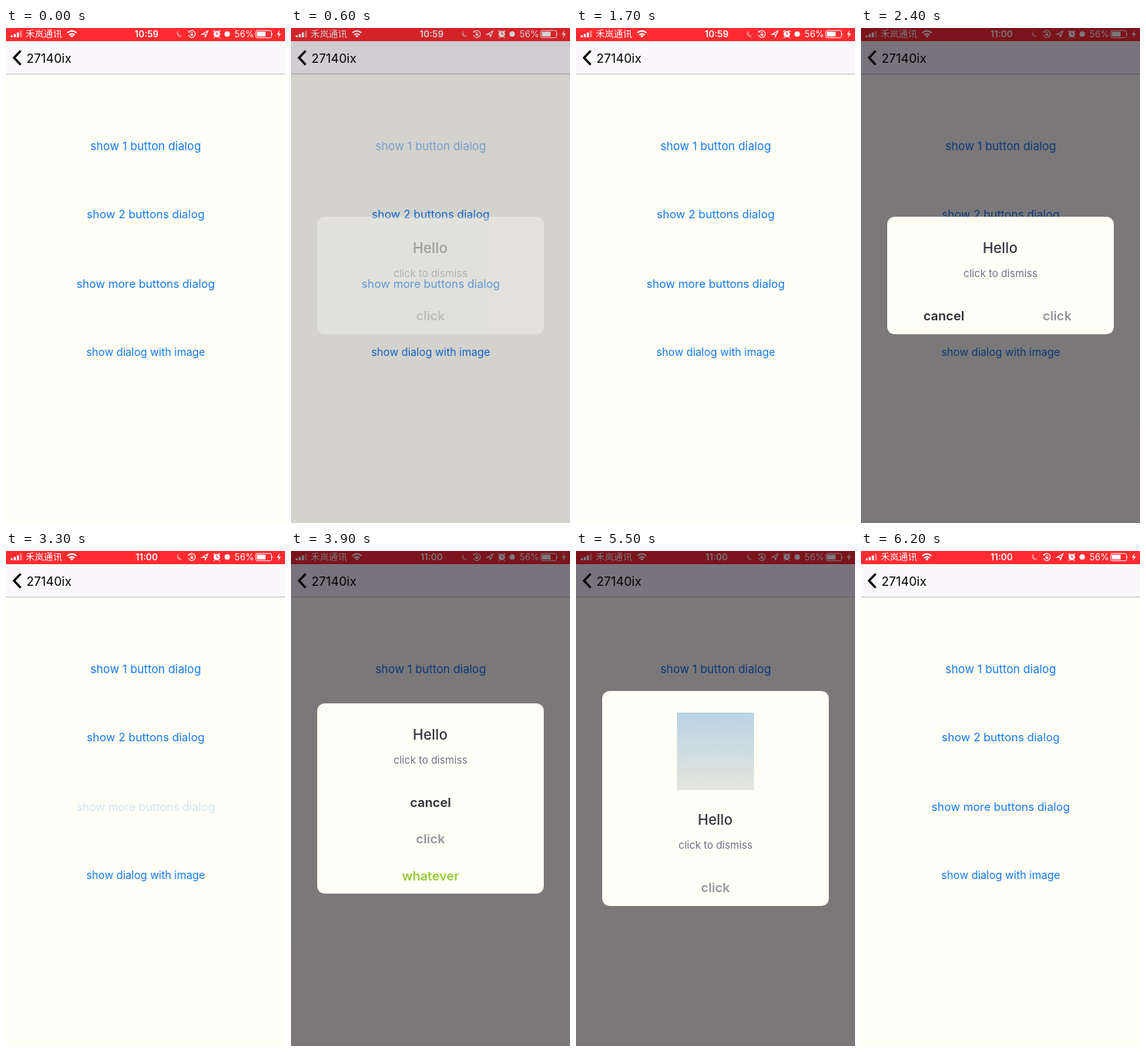
Recreate the animation shown at these times as an HTML page. Size 362 px wide and 640 px high, loop 6.7 s.

```html
<!DOCTYPE html>
<html lang="en">
<head>
<meta charset="utf-8">
<title>Dialogs</title>
<style>
  html, body { margin: 0; width: 100%; height: 100%; overflow: hidden; background: #fffff7; }
  svg { display: block; width: 100vw; height: 100vh; font-family: Inter, Roboto, sans-serif; }
  .mid { text-anchor: middle; }
  .link { fill: #1478ee; text-anchor: middle; }
  .status { fill: #fff; font-size: 11.6px; }
  .status .line { fill: none; stroke: #fff; stroke-width: 1.1; }
  .carrier { font-family: "Noto Sans CJK SC", "Noto Sans CJK", sans-serif; font-size: 11.8px; }
  .title { font-size: 18.5px; font-weight: 500; fill: #34343f; text-anchor: middle; }
  .note { font-size: 13.3px; fill: #70708a; text-anchor: middle; }
  .button { font-size: 16.5px; font-weight: 600; text-anchor: middle; }
</style>
</head>
<body>
<svg viewBox="0 0 362 640" preserveAspectRatio="none">
  <defs>
    <linearGradient id="picture" x2="0" y2="1">
      <stop stop-color="#b9d3e6"/><stop offset="1" stop-color="#e4e6dc"/>
    </linearGradient>
  </defs>

  <rect width="362" height="640" fill="#fffff7"/>
  <rect y="17" width="362" height="43" fill="#fbf8fc"/>
  <rect y="59.2" width="362" height=".8" fill="#b4b2b6"/>
  <path d="M19 29.5 10.5 38.5 19 47.5" fill="none" stroke="#000" stroke-width="2.9"/>
  <text x="26.5" y="44.5" font-size="16">27140ix</text>
  <g id="links"></g>

  <rect width="362" height="17" fill="#ff2b30"/>
  <g class="status">
    <path d="M6 9.5h2.8V12H6zM10 7.8h2.8V12H10zM14 5.8h2.8V12H14z"/>
    <path d="M18 3.6h2.8V12H18z" opacity=".4"/>
    <text class="carrier" x="25.5" y="12.2">禾岚通讯</text>
    <path class="line" d="M79.6 6.3Q85.5 1 91.4 6.3M82 9Q85.5 5.8 89 9" style="stroke-width:1.9"/>
    <path d="M83.4 10.2Q85.5 8.5 87.6 10.2L85.5 12.4z"/>
    <text id="clock" class="mid" x="182.5" y="12" font-weight="600"></text>
    <path d="M224 3.6A4.2 4.2 0 1 0 229 10.2A4.7 4.7 0 0 1 224 3.6z" opacity=".5"/>
    <g class="line">
      <path d="M238.1 4.4A4.5 4.5 0 1 1 236.8 9.2"/>
      <path d="M240 7.4V6.6a1.2 1.2 0 0 1 2.4 0v.8" stroke-width=".8"/>
      <path d="M254.2 8.2 262 3.8 258.5 12V8.2z"/>
    </g>
    <path d="M236.6 3.2V6.2L239.4 5zM239.5 7.4h3.4v2.6h-3.4z"/>
    <circle cx="273.5" cy="7.9" r="4.2"/>
    <path class="line" d="M269 4.8l2-1.9M278 4.8l-2-1.9M270.6 11.6l-1 1.2M276.4 11.6l1 1.2"/>
    <path d="M273.5 5.4V8.2H275.7" fill="none" stroke="#ff2b30"/>
    <circle cx="287" cy="7.8" r="3.5"/>
    <text x="296.5" y="12">56%</text>
    <rect class="line" x="324" y="3.2" width="20.5" height="9.4" rx="2" style="stroke-width:.9"/>
    <path d="M325.5 4.7h11.3v6.4h-11.3zM345.5 6.2q1.8 1.7 0 3.4z"/>
    <path d="M355.2 2.8 351.4 8.4h2.6L352.8 13l4-5.8h-2.7z"/>
  </g>

  <g id="shade"><rect width="362" height="640" fill="#07000b" fill-opacity=".53"/></g>
  <g id="dialogs"></g>
</svg>
<script>
const LOOP = 6700, STEP = 100, CLOCK_CHANGE = 2000;
const DARK = '#2c2c38', GREY = '#96969f', GREEN = '#98cc3a';
const cancel = (x, y) => ({ label: 'cancel', x, y, color: DARK });
const click = (x, y) => ({ label: 'click', x, y, color: GREY });

// Each scene: link tapped at open, dialog button tapped at press, fade-out from fade to end.
const scenes = [
  { text: 'show 1 button dialog', y: 158, size: 14.85, open: 400, press: 1400, fade: 1400, end: 1700,
    top: 244, height: 152, buttons: [click(181, 378)] },
  { text: 'show 2 buttons dialog', y: 246.3, size: 14.7, open: 2000, press: 2800, fade: 2800, end: 3000,
    top: 244, height: 152, buttons: [cancel(107.5, 378), click(254.5, 378)] },
  { text: 'show more buttons dialog', y: 335.5, size: 14.7, open: 3300, press: 4400, fade: 4400, end: 4600,
    top: 197, height: 246, buttons: [cancel(181, 330.5), click(181, 378),
      { label: 'whatever', x: 181, y: 425.5, color: GREEN }] },
  { text: 'show dialog with image', y: 423.8, size: 13.9, open: 5000, press: 5900, fade: 6000, end: 6200,
    top: 181, height: 278, image: 126, buttons: [click(181, 441)] }
];

const $ = id => document.getElementById(id);
const clamp = v => Math.max(0, Math.min(1, v));

$('links').innerHTML = scenes.map(s =>
  `<text class="link" x="181.3" y="${s.y}" font-size="${s.size}">${s.text}</text>`).join('');

$('dialogs').innerHTML = scenes.map(s => {
  const textTop = s.top + (s.image || 0);
  return `<g>
    <rect x="34" y="${s.top}" width="294" height="${s.height}" rx="9.5" fill="#fffff7"/>
    ${s.image ? `<rect x="131" y="${s.top + 28}" width="100" height="100" fill="url(#picture)"/>` : ''}
    <text class="title" x="180.5" y="${textTop + 47}">Hello</text>
    <text class="note" x="181" y="${textTop + 78}">click to dismiss</text>
    ${s.buttons.map(b =>
      `<text class="button" x="${b.x}" y="${b.y}" fill="${b.color}">${b.label}</text>`).join('')}
  </g>`;
}).join('');

const links = [...$('links').children];
const dialogs = [...$('dialogs').children];

function draw(now) {
  const t = Math.floor((now % LOOP) / STEP) * STEP;
  let shade = 0;
  scenes.forEach((s, i) => {
    const since = t - s.open;
    const rise = clamp((since - 100) / 300);
    const shown = rise * clamp((s.end - t) / (s.end - s.fade));
    shade = Math.max(shade, shown);
    links[i].setAttribute('opacity', since < 0 ? 1 : 0.2 + 0.8 * rise);
    dialogs[i].setAttribute('opacity', shown);
    dialogs[i].lastElementChild.setAttribute('opacity', t < s.press ? 1 : 0.2);
  });
  $('shade').setAttribute('opacity', shade);
  $('clock').textContent = t < CLOCK_CHANGE ? '10:59' : '11:00';
}

const start = performance.now();
function frame() {
  draw(performance.now() - start);
  requestAnimationFrame(frame);
}
frame();
</script>
</body>
</html>
```
